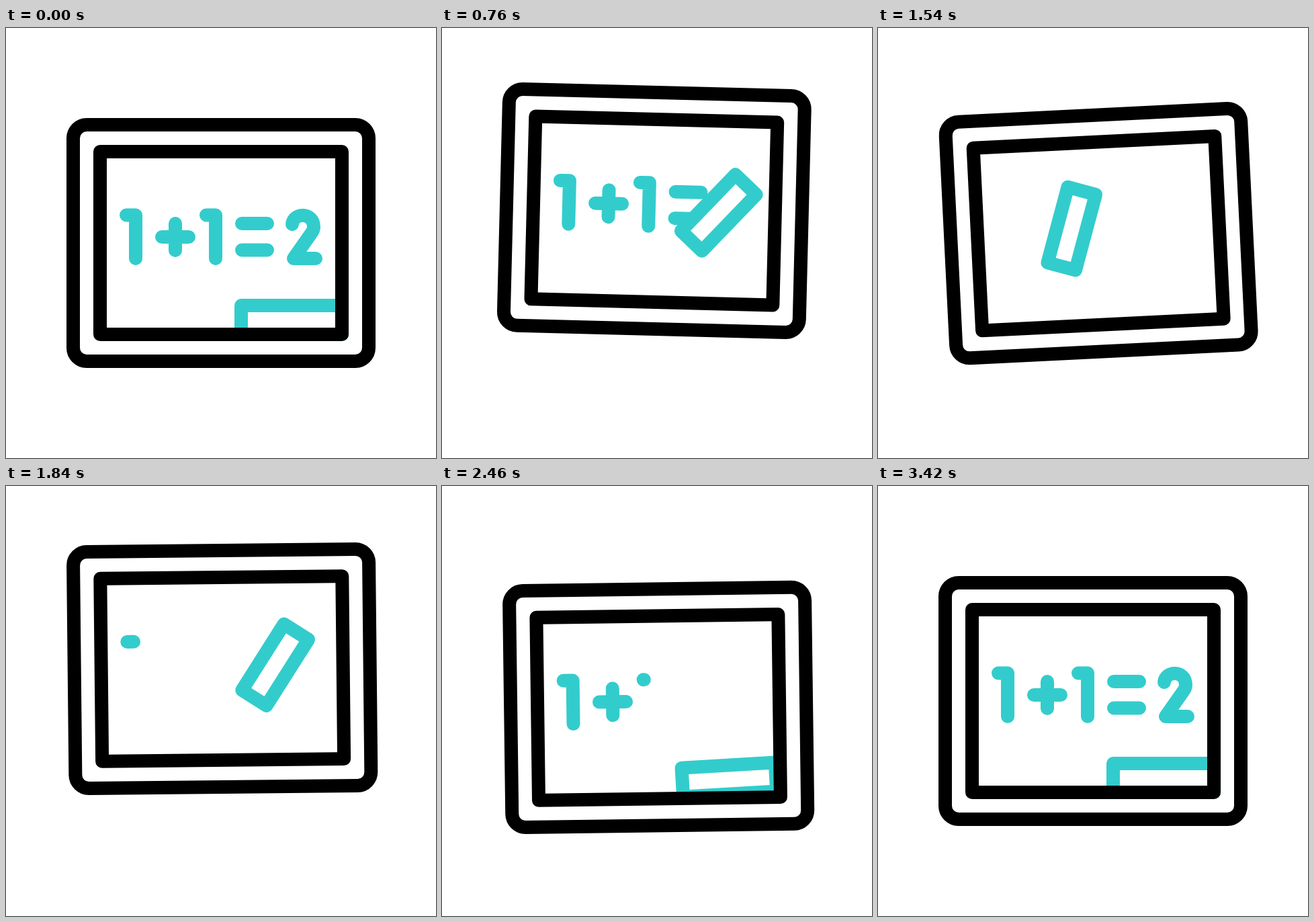
Animation of 640x640 px, one loop 3600 ms. Source, as an HTML page with a canvas:

```html
<!DOCTYPE html>
<html lang="en">
<head>
<meta charset="utf-8">
<title>Blackboard sum</title>
<style>
html, body { margin: 0; width: 100%; height: 100%; overflow: hidden; background: #fff; }
canvas { display: block; }
</style>
</head>
<body>
<canvas id="stage" width="640" height="640"></canvas>
<script>
const ctx = document.getElementById('stage').getContext('2d');
const LOOP = 3600, TEAL = '#33cccc';
const ERASED = 1300, WRITE = 1800, GLYPH = 328;

const ease = p => (1 - Math.cos(Math.PI * p)) / 2;

// Eased value at time t through [time, value] keys
function track(t, keys) {
  if (t <= keys[0][0]) return keys[0][1];
  for (let i = 1; i < keys.length; i++) {
    const [t0, a] = keys[i - 1], [t1, b] = keys[i];
    if (t < t1) return a + (b - a) * ease((t - t0) / (t1 - t0));
  }
  return keys[keys.length - 1][1];
}

const boardY = [[220, 0], [760, -48], [1300, 10], [1840, -48], [2380, 10], [2920, 0]];
const boardTilt = [[495, 0], [1040, 3], [1603, -3], [2148, 3], [2687, -3], [3230, 0]];

const eraserTimes = [220, 760, 1300, 1840, 2560];
const eraserKeys = values => values.map((v, i) => [eraserTimes[i], v]);
const eraserX = eraserKeys([425, 416, 196, 399, 425]);
const eraserY = eraserKeys([434.5, 320.6, 308, 315, 434.5]);
const eraserTilt = eraserKeys([0, -47.5, -83, -57, 0]);
const eraserLength = [[220, 150], [480, 116.5], [2300, 116.5], [2560, 150]];

// Pen strokes: path, length, start and duration counted in glyphs
const strokes = [
  ['M179 278.5H193V343', 78, 0, 1],
  ['M232 311H272', 40, 1, .5],
  ['M252 291V331', 40, 1.5, .5],
  ['M298 278.5H312V343', 78, 2, 1],
  ['M351 291H389', 38, 3, .5],
  ['M351 330.5H389', 38, 3.5, .5],
  ['M426 292C428 274 458 274 458 296Q458 301 454 306L428 343H461', 150, 4, .93]
].map(([d, length, start, span]) => ({ path: new Path2D(d), length, start, span }));

const radians = deg => deg * Math.PI / 180;

function drawSum(progress) {
  ctx.strokeStyle = TEAL;
  for (const s of strokes) {
    const part = Math.min(1, (progress - s.start) / s.span);
    if (part <= 0) continue;
    ctx.setLineDash(part < 1 ? [Math.max(.01, part * s.length), 999] : []);
    ctx.stroke(s.path);
  }
  ctx.setLineDash([]);
}

function place(x, y, deg) {
  ctx.translate(x, y);
  ctx.rotate(radians(deg));
}

function draw(t) {
  ctx.setTransform(1, 0, 0, 1, 0, 0);
  ctx.fillStyle = '#fff';
  ctx.fillRect(0, 0, 640, 640);
  ctx.lineWidth = 20;
  ctx.lineCap = ctx.lineJoin = 'round';

  place(320, 154 + track(t, boardY), track(t, boardTilt));
  ctx.translate(-320, -154);

  const pose = [eraserX, eraserY, eraserTilt].map(keys => track(t, keys));

  ctx.save();
  if (t < ERASED) {
    // Only the side the eraser has not reached stays visible
    ctx.save();
    place(...pose);
    ctx.beginPath();
    ctx.rect(-700, -700, 1400, 700);
    ctx.restore();
    ctx.clip();
    drawSum(5);
  } else {
    drawSum((t - WRITE) / GLYPH);
  }
  ctx.restore();

  ctx.save();
  place(...pose);
  const length = track(t, eraserLength);
  ctx.beginPath();
  ctx.rect(-length / 2, -21.5, length, 43);
  ctx.fill();
  ctx.strokeStyle = TEAL;
  ctx.stroke();
  ctx.restore();

  ctx.strokeStyle = '#000';
  ctx.strokeRect(140, 184, 360, 272);
  ctx.beginPath();
  ctx.roundRect(100, 144, 440, 352, 20);
  ctx.stroke();
}

const start = performance.now();
function frame() {
  draw((performance.now() - start) % LOOP);
  requestAnimationFrame(frame);
}
frame();
</script>
</body>
</html>
```
